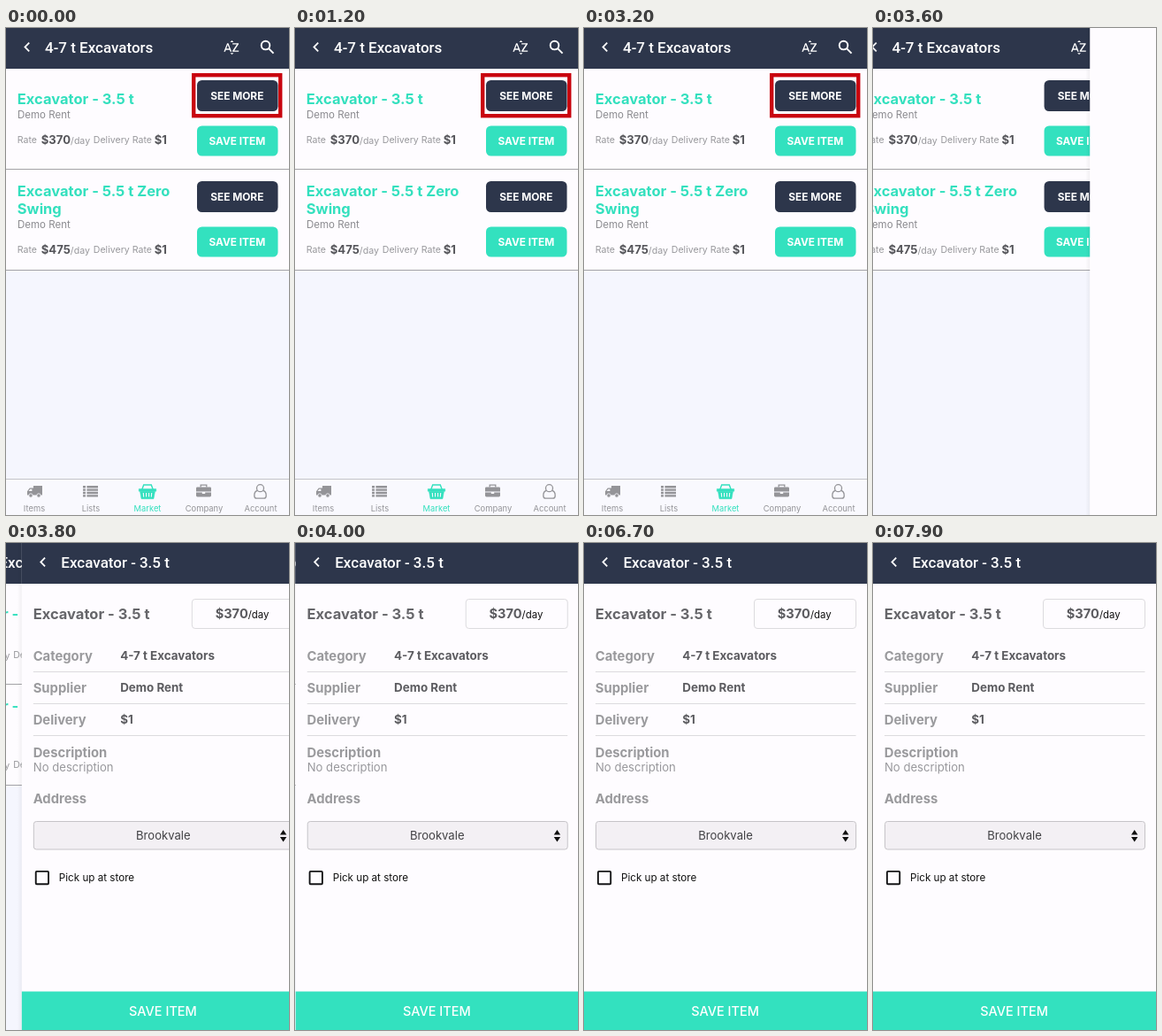
An HTML page that plays this animation: 320x550 px, repeating every 8000 ms.

```html
<!DOCTYPE html>
<html lang="en">
<head>
<meta charset="utf-8">
<title>Equipment hire</title>
<style>
html, body { margin: 0; width: 100%; height: 100%; overflow: hidden; background: #fefcff; }
svg { display: block; width: 100vw; height: 100vh; }
text { font-family: Inter, "Liberation Sans", sans-serif; white-space: pre; }
.head { font: 500 17px Roboto, sans-serif; fill: #fff; }
.title { font-size: 16.5px; font-weight: 700; }
.name { font-size: 11.5px; fill: #8b8b8f; }
.small { font-size: 10.6px; fill: #98989c; }
.price { font-size: 13.1px; font-weight: 700; fill: #55555a; }
.btn { font-size: 11.85px; font-weight: 700; fill: #fff; text-anchor: middle; }
.tab { font-size: 9.4px; text-anchor: middle; }
.label { font-size: 14.8px; font-weight: 700; fill: #9a9a9d; }
.value { font-size: 13.4px; font-weight: 700; fill: #5c5c60; }
.note { font-size: 13.1px; fill: #98989c; }
.mid { text-anchor: middle; }
</style>
</head>
<body>
<svg viewBox="0 0 320 550" preserveAspectRatio="none">
  <defs>
    <linearGradient id="shade">
      <stop offset="0" stop-color="#000" stop-opacity="0"/>
      <stop offset="1" stop-color="#000" stop-opacity=".05"/>
    </linearGradient>
    <path id="back" fill="#fff" transform="translate(13 10.7) scale(.9)"
      d="M15.41 7.41 14 6l-6 6 6 6 1.41-1.41L10.83 12z"/>
  </defs>

  <g id="list">
    <rect width="320" height="550" fill="#f5f6fe"/>
    <rect y="45" width="320" height="228" fill="#fefcff"/>
    <rect width="320" height="46" fill="#2d364b"/>
    <use href="#back"/>
    <text class="head" x="44" y="28">4-7 t Excavators</text>
    <path transform="translate(245 12) scale(.833)" fill="#fff"
      d="M14.94 4.66h-4.72l2.36-2.36zm-4.69 14.71h4.66l-2.33 2.33zM6.1 6.27 1.6 17.73h1.84l.92-2.45h5.11l.92 2.45h1.84L7.74 6.27zm-1.13 7.37 1.94-5.18 1.94 5.18zm10.76 2.5h6.12v1.59h-8.53v-1.29l5.92-8.56h-5.88v-1.6h8.3v1.26z"/>
    <g fill="none" stroke="#fff" stroke-width="1.9">
      <circle cx="293.5" cy="19.6" r="4.8"/>
      <path d="m297 23.2 5.5 5.5"/>
    </g>
    <g id="items"></g>
    <g id="tabs">
      <rect y="509" width="320" height="41" fill="#f9f9fe"/>
      <path d="M0 509.5h320" stroke="#c4c4c9"/>
      <g id="labels"></g>
      <g fill="#949498">
        <path d="M31 517h10v10.5H24v-4.3l2.8-3.7H31z"/>
        <path d="m25.6 523 1.8-2.3h2v2.3z" fill="#f9f9fe"/>
        <g stroke="#f9f9fe" stroke-width=".8">
          <circle cx="28" cy="528" r="2.2"/><circle cx="37" cy="528" r="2.2"/>
        </g>
        <path d="M87 517h3v2.4h-3zm4.4 0H104v2.4H91.4zM87 520.4h3v2.4h-3zm4.4 0H104v2.4H91.4zM87 523.8h3v2.4h-3zm4.4 0H104v2.4H91.4zM87 527.2h3v2.4h-3zm4.4 0H104v2.4H91.4z"/>
        <path d="M216.4 518.4h14.2q1.4 0 1.4 1.4v3.8h-17v-3.8q0-1.4 1.4-1.4zM215 524.5h6.8v1.6h3.4v-1.6h6.8v3.6q0 1.4-1.4 1.4h-14.2q-1.4 0-1.4-1.4z"/>
        <path d="M220.2 518.4v-2.2h6.6v2.2" fill="none" stroke="#949498" stroke-width="1.3"/>
      </g>
      <g fill="none" stroke="#949498" stroke-width="1.3">
        <circle cx="287.5" cy="519.7" r="4"/>
        <path d="M284.2 522.5c-2.4.5-3.4 2.7-3.4 5.4 0 2 1 3.3 2.6 3.3h8.2c1.6 0 2.6-1.3 2.6-3.3 0-2.7-1-4.9-3.4-5.4"/>
      </g>
      <g stroke="#33e0be" fill="none" stroke-width="1.4">
        <path d="m153.5 522 2.2-6h2.5m8.3 6-2.2-6h-2.5M157.5 516h5"/>
        <path d="M150.3 520.6h19.4v2.6h-19.4z" fill="#33e0be" stroke-width=".6"/>
        <path d="M151.6 523.5h16.8l-1.5 8.2h-13.8z" fill="#33e0be" stroke-width=".6"/>
        <path d="m155.3 525 .4 4.6m2.9-4.6v4.6m3-4.6v4.6m3.1-4.6-.4 4.6" stroke="#f9f9fe" stroke-width="1.1"/>
      </g>
    </g>
    <rect id="mark" x="212.2" y="53.2" width="98" height="46" fill="none" stroke="#c9040f" stroke-width="4.4"/>
  </g>

  <g id="detail">
    <rect x="-5" width="5" height="550" fill="url(#shade)"/>
    <rect width="320" height="550" fill="#fefcff"/>
    <g id="content">
      <rect width="320" height="46" fill="#2d364b"/>
      <use href="#back"/>
      <text class="head" x="44.5" y="28">Excavator - 3.5 t</text>
      <text class="title" x="12.8" y="86.4" fill="#66666a">Excavator - 3.5 t</text>
      <rect x="192.5" y="63.5" width="115" height="33" rx="3.5" fill="none" stroke="#dcdbde"/>
      <text x="218.8" y="85.3" font-size="14.6" font-weight="700" fill="#5c5c60">$370<tspan font-size="11.4" font-weight="400" fill="#111">/day</tspan></text>
      <g id="rows"></g>
      <text class="label" x="12.8" y="241.6">Description</text>
      <text class="note" x="13" y="258.3">No description</text>
      <text class="label" x="12.8" y="293.6">Address</text>
      <rect x="13.5" y="314.5" width="294" height="31.5" rx="3" fill="#f3f0f4" stroke="#c6c4c8"/>
      <text class="mid" x="160" y="335" font-size="13.1" fill="#424245">Brookvale</text>
      <path d="M292 329.6l3.7-5.6 3.7 5.6zm0 2.4h7.4l-3.7 5.6z" fill="#111"/>
      <rect x="15.9" y="370.9" width="14.3" height="14.3" rx="1" fill="none" stroke="#161618" stroke-width="1.9"/>
      <text x="42" y="381.7" font-size="11.65" fill="#111">Pick up at store</text>
      <rect y="506.5" width="320" height="43.5" fill="#33e1bf"/>
      <text class="mid" x="159.6" y="534.2" font-size="14.5" font-weight="500" fill="#fff">SAVE ITEM</text>
    </g>
  </g>
</svg>
<script>
const LOOP = 8000, STEP = 100;
const PUSH = { start: 3566, length: 500, parallax: 0.3 };
const SUPPLIER = 'Demo Rent';
const el = id => document.getElementById(id);
const text = (cls, x, y, s, extra = '') => `<text class="${cls}" x="${x}" y="${y}" ${extra}>${s}</text>`;

const button = (y, h, fill, s) =>
  `<rect x="216" y="${y}" width="91.5" height="${h}" rx="5.5" fill="${fill}"/>` +
  text('btn', 261.3, y + h / 2 + 4.2, s);

// y is the top of the item, lines are the wrapped title
function item(y, lines, price) {
  const extra = (lines.length - 1) * 20;
  const base = y + 84.5 + extra;
  return lines.map((s, i) => text('title', 12.8, y + 41.4 + i * 20, s, 'fill="#33e0be"')).join('') +
    text('name', 13, y + 57 + extra, SUPPLIER) +
    text('small', 12.8, base, 'Rate') +
    `<text class="price" x="39.8" y="${base + 1}">${price}<tspan class="small" font-weight="400">/day</tspan></text>` +
    text('small', 98.8, base, 'Delivery Rate') +
    text('price', 167.8, base + 1, '$1');
}

el('items').innerHTML =
  item(45, ['Excavator - 3.5 t'], '$370') +
  item(149, ['Excavator - 5.5 t Zero', 'Swing'], '$475') +
  [59, 173].map(y => button(y, 35, '#2d364b', 'SEE MORE') + button(y + 51.5, 34, '#33e1bf', 'SAVE ITEM')).join('') +
  '<path d="M0 159.5h320M0 273.5h320" stroke="#a3a3a6"/>';

el('labels').innerHTML = ['Items', 'Lists', 'Market', 'Company', 'Account']
  .map((s, i) => text('tab', 32 + 64 * i, 545.6, s, `fill="${i === 2 ? '#33e0be' : '#949498'}"`)).join('');

el('rows').innerHTML = [['Category', '4-7 t Excavators'], ['Supplier', SUPPLIER], ['Delivery', '$1']]
  .map(([label, value], i) => {
    const y = 133.2 + 36 * i;
    return text('label', 12.8, y, label) + text('value', 111.3, y - 0.8, value) +
      `<path d="M13 ${145.5 + 36 * i}h294.5" stroke="#dcdbde"/>`;
  }).join('');

const bez = (a, b, s) => 3 * (1 - s) ** 2 * s * a + 3 * (1 - s) * s * s * b + s ** 3;

function ease(x) {
  if (x <= 0) return 0;
  if (x >= 1) return 1;
  let lo = 0, hi = 1;
  for (let i = 0; i < 30; i++) {
    const s = (lo + hi) / 2;
    if (bez(0.2833, 0.31833, s) < x) lo = s; else hi = s;
  }
  return bez(0.99, 0.99, lo);
}

const show = (id, on) => el(id).setAttribute('visibility', on ? 'visible' : 'hidden');
const slide = (id, x) => el(id).setAttribute('transform', `translate(${x.toFixed(2)} 0)`);

function draw(ms) {
  const t = Math.floor(ms % LOOP / STEP) * STEP;
  const p = ease((t - PUSH.start) / PUSH.length);
  slide('list', -320 * PUSH.parallax * p);
  slide('detail', 320 * (1 - p));
  show('tabs', p === 0);
  show('mark', p === 0);
  show('detail', p > 0);
  // the new page slides in blank before its content is ready
  show('content', p > 0.3);
}

const begin = performance.now();
function tick() {
  draw(performance.now() - begin);
  requestAnimationFrame(tick);
}
tick();
</script>
</body>
</html>
```
